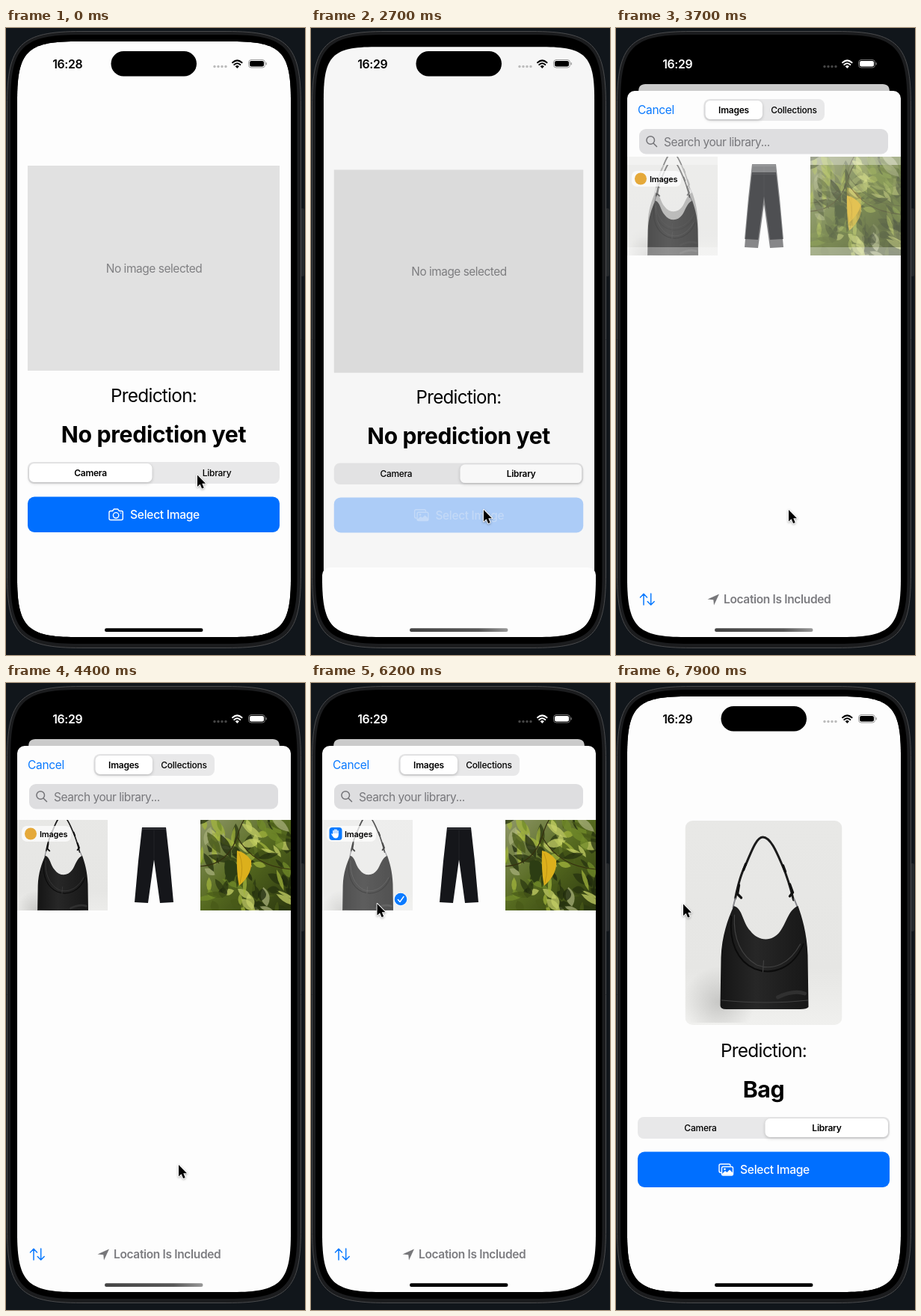
Write an HTML page with a canvas that moves like this. It is 400 px wide and 838 px high and loops after 8000 ms.

```html
<!DOCTYPE html>
<html lang="en">
<head>
<meta charset="utf-8">
<style>
  html, body { margin: 0; width: 400px; height: 838px; overflow: hidden; background: #11161b; }
  canvas { display: block; }
</style>
</head>
<body>
<canvas id="stage" width="400" height="838"></canvas>
<script>
const LOOP = 8000, BLUE = '#006fff';
const OPEN = 2657, CLOSE = 7420, SELECT = 5700;
const stage = document.getElementById('stage').getContext('2d');
let ctx = stage;

const lerp = (a, b, k) => a + (b - a) * k;
const ramp = (t, from, to) => Math.max(0, Math.min(1, (t - from) / (to - from)));
const ease = (t, from, to) => { const k = ramp(t, from, to); return k * k * (3 - 2 * k); };
const spring = (t, w) => t <= 0 ? 0 : Math.min(1, 1.002 * (1 - (1 + w * t) * Math.exp(-w * t)));

function group(draw, alpha = 1) {
  ctx.save();
  ctx.globalAlpha *= alpha;
  draw();
  ctx.restore();
}
function box(x, y, w, h, r, fill) {
  ctx.beginPath();
  ctx.roundRect(x, y, w, h, r);
  if (fill) { ctx.fillStyle = fill; ctx.fill(); }
}
// Rectangle with continuous-curvature corners
function smoothBox(x, y, w, h, r, fill) {
  const e = 1.53 * r, c = 0.268 * r, x2 = x + w, y2 = y + h;
  ctx.beginPath();
  ctx.moveTo(x, y + e);
  ctx.bezierCurveTo(x, y + c, x + c, y, x + e, y);
  ctx.lineTo(x2 - e, y);
  ctx.bezierCurveTo(x2 - c, y, x2, y + c, x2, y + e);
  ctx.lineTo(x2, y2 - e);
  ctx.bezierCurveTo(x2, y2 - c, x2 - c, y2, x2 - e, y2);
  ctx.lineTo(x + e, y2);
  ctx.bezierCurveTo(x + c, y2, x, y2 - c, x, y2 - e);
  ctx.closePath();
  if (fill) { ctx.fillStyle = fill; ctx.fill(); }
}
function disc(x, y, r, fill) {
  ctx.beginPath();
  ctx.arc(x, y, r, 0, 7);
  ctx.fillStyle = fill;
  ctx.fill();
}
function fillPath(d, color) {
  ctx.fillStyle = color;
  ctx.fill(new Path2D(d));
}
function line(d, color, width = 1.5) {
  ctx.strokeStyle = color;
  ctx.lineWidth = width;
  ctx.lineCap = ctx.lineJoin = 'round';
  ctx.stroke(new Path2D(d));
}
function text(str, x, y, size, weight = 400, color = '#000', align = 'center', track = -0.03) {
  ctx.font = `${weight} ${size}px Inter, sans-serif`;
  ctx.letterSpacing = `${size * track}px`;
  ctx.textAlign = align;
  ctx.fillStyle = color;
  ctx.fillText(str, x, y);
}
function segments(x, y, w, labels, centers, thumbX, thumbW, active) {
  box(x, y, w, 29, 8, '#e8e8e9');
  group(() => {
    ctx.shadowColor = 'rgba(0,0,0,.2)';
    ctx.shadowBlur = 4;
    ctx.shadowOffsetY = 1.5;
    box(thumbX, y + 2, thumbW, 25, 6.5, '#fff');
  });
  labels.forEach((label, i) =>
    text(label, centers[i], y + 18.7, 12, i === active ? 600 : 500, '#000', 'center', -0.02));
}

// Handbag photograph, 210 x 273
function bagPhoto() {
  const wall = ctx.createLinearGradient(0, 0, 0, 273);
  wall.addColorStop(0, '#e8e8e6');
  wall.addColorStop(0.72, '#e6e6e4');
  wall.addColorStop(1, '#f0f0ee');
  box(0, 0, 210, 273, 0, wall);
  const shade = ctx.createRadialGradient(45, 243, 2, 45, 243, 48);
  shade.addColorStop(0, 'rgba(120,120,118,.3)');
  shade.addColorStop(1, 'rgba(120,120,118,0)');
  box(0, 190, 100, 80, 0, shade);
  line('M67 104C71 84 75 70 81 59C88 43 95 22 104 22C115 22 124 46 131 62C137 76 141 90 145 106', '#1b1b1b', 3);
  line('M72 86L70 98L75 103M140 85L144 96L140 101M81 58L78 66M131 60L134 68', '#111', 3.4);
  line('M67 104L64 116M146 105L150 115', '#85858a', 2);
  const hide = ctx.createLinearGradient(48, 0, 165, 0);
  hide.addColorStop(0, '#151515');
  hide.addColorStop(0.4, '#272727');
  hide.addColorStop(1, '#171717');
  fillPath('M65 114C77 117 77 137 87 147C98 162 117 162 127 148C135 138 138 119 151 114C156 128 163 150 164 180L165 249Q163 252 154 252L55 252Q47 252 47 247L48 183C49 154 57 132 65 114Z', hide);
  line('M62 128C58 162 70 188 93 198C116 207 145 198 158 165', '#0b0b0b', 2);
  line('M66 126C64 158 75 181 96 193C118 201 140 191 154 165M105 187L104 202M49 240Q110 246 164 240', '#414141', 1.2);
  line('M124 236Q145 226 160 231', '#303030', 5);
}

// Foliage photograph, 121 x 121
function leafPhoto() {
  let seed = 11;
  const rnd = () => (seed = seed * 16807 % 2147483647) / 2147483647;
  const tones = ['#1f290d', '#2b3811', '#485a18', '#718b29', '#a1b43c', '#c4cf66', '#26320f', '#a6ad78'];
  const base = ctx.createLinearGradient(0, 0, 121, 121);
  base.addColorStop(0, '#8f9768');
  base.addColorStop(0.5, '#55691f');
  base.addColorStop(1, '#2c380f');
  box(0, 0, 121, 121, 0, base);
  for (let i = 0; i < 110; i++) group(() => {
    ctx.translate(rnd() * 121, rnd() * 121);
    ctx.rotate(rnd() * 2.2 - 0.3);
    const l = 6 + rnd() * 11, w = 2 + rnd() * 4;
    fillPath(`M${-l} 0Q0 ${-w * 2} ${l} 0Q0 ${w * 2} ${-l} 0Z`, tones[rnd() * 8 | 0]);
  }, 0.75);
  line('M0 62Q38 60 50 20T78 0M50 24Q72 62 121 66', '#35300f', 1.2);
  fillPath('M33 55Q48 50 50 64Q48 80 38 84Q30 72 33 55Z', '#2c3d13');
  fillPath('M49 41Q60 43 68 54Q70 72 52 88Q48 72 49 41Z', '#dcb01c');
  line('M52 45Q59 62 53 84', '#b88e13', 0.8);
}

function trousers() {
  fillPath('M45 10H77L82 55L87 110L69 111L61 53L53 111L35 110L40 55Z', '#15161a');
  line('M46 12H76', '#4a4a50', 1);
  line('M61 14V52', '#27282d', 0.8);
}

function makeRow() {
  const canvas = document.createElement('canvas');
  canvas.width = 366;
  canvas.height = 121;
  ctx = canvas.getContext('2d');
  const scale = 121 / 210;
  group(() => {
    box(0, 0, 121, 121, 0);
    ctx.clip();
    ctx.translate(0, -18);
    ctx.scale(scale, scale);
    bagPhoto();
  });
  group(() => { ctx.translate(122, 0); trousers(); });
  group(() => {
    ctx.translate(245, 0);
    box(0, 0, 121, 121, 0);
    ctx.clip();
    leafPhoto();
  });
  ctx = stage;
  return canvas;
}
const photoRow = makeRow();

function phone() {
  box(0, 0, 400, 838, 0, '#11161b');
  box(394, 241, 5, 91, 2, '#26292c');
  smoothBox(1.5, 4.5, 393, 824, 65, '#1b1c1e');
  ctx.strokeStyle = '#4a4b4d';
  ctx.lineWidth = 1;
  ctx.stroke();
  smoothBox(6, 9, 383.5, 814, 60, '#000');
}

function buttonIcon(camera) {
  if (camera) {
    line('M140 645.5H142.5L144.5 643H149.5L151.5 645.5H154.5Q156.3 645.5 156.3 647.3V655.5Q156.3 657.5 154.3 657.5H140Q138 657.5 138 655.5V647.5Q138 645.5 140 645.5Z', '#fff', 1.4);
    line('M150.8 651.3A3.7 3.7 0 1 1 143.4 651.3A3.7 3.7 0 1 1 150.8 651.3M153.6 648.2V648.3', '#fff', 1.4);
  } else {
    line('M140.5 654.5Q138 654.5 138 652V645Q138 643 140 643H151Q153 643 153 645', '#fff', 1.4);
    line('M143.5 646.5H154.5Q156.5 646.5 156.5 648.5V656Q156.5 658 154.5 658H143.5Q141.5 658 141.5 656V648.5Q141.5 646.5 143.5 646.5Z', '#fff', 1.4);
    fillPath('M142 656L146 652L148.5 654L152 650.5L156 654.5V657.5H142Z', '#fff');
    disc(145.5, 649.8, 1.3, '#fff');
  }
}

function mainView(t, p) {
  const scale = 1 - 0.082 * p, radius = lerp(51, 9, p);
  ctx.translate(198, 18 + 57 * p);
  ctx.scale(scale, scale);
  ctx.translate(-198, -18);
  smoothBox(15, 18, 366, 796, radius, '#fdfdfd');
  const done = t >= CLOSE, slide = ease(t, 90, 310);
  if (done) group(() => {
    box(92.5, 184, 210, 273, 10);
    ctx.clip();
    ctx.translate(92.5, 184);
    bagPhoto();
  });
  else {
    box(29, 184, 337, 274, 0, '#e1e1e1');
    text('No image selected', 198, 326.5, 15.5, 400, '#808083');
  }
  text('Prediction:', 197.5, 500, 24.4);
  text(done ? 'Bag' : 'No prediction yet', 197.5, 554, 30.3, 700, '#000', 'center', -0.012);
  segments(29, 580, 337, ['Camera', 'Library'], [113, 282], lerp(31, 199.5, slide), 164.5, t < 200 ? 0 : 1);
  const pressed = ease(t, 2450, 2600) - ease(t, 2750, 3000);
  group(() => {
    box(29, 626.5, 337, 47.5, 9, BLUE);
    buttonIcon(t < 100);
    text('Select Image', 212.5, 656, 15.6, 500, '#fff', 'center', -0.02);
  }, 1 - 0.7 * pressed);
  smoothBox(15, 18, 366, 796, radius, `rgba(0,0,0,${0.2 * p})`);
}

function badge(t) {
  const hand = ease(t, 4900, 5100);
  box(21, 191, 66, 21, 7, 'rgba(255,255,255,.72)');
  group(() => disc(33, 201.5, 8, '#e5a93a'), 1 - hand);
  group(() => {
    box(24.5, 193, 17, 17, 4, '#0a7aff');
    line('M30 202V197.5M32 201V196M34 201V196.2M36 202V197.8', '#fff', 1.5);
    fillPath('M29.2 201H36.8V203.5Q36.5 207.5 33 207.5Q30.5 207.5 29 205L27 201.7Q27.7 200.7 29.2 202.5Z', '#fff');
  }, hand);
  text('Images', 45, 205.6, 11, 600, '#000', 'left', -0.02);
}

function picker(t) {
  text('Cancel', 29, 115, 15.5, 400, '#0a7aff', 'left', -0.02);
  segments(117.5, 95, 161.5, ['Images', 'Collections'], [157.5, 238], 119.5, 76.5, 0);
  box(31, 135, 333, 33.5, 9, '#dedee0');
  line('M51.5 150A5.3 5.3 0 1 1 40.9 150A5.3 5.3 0 1 1 51.5 150M50 154L54.5 158.5', '#737377', 1.5);
  text('Search your library...', 64, 157.5, 15.5, 400, '#77777b', 'left');

  const settle = ramp(t, 3600, 3800);
  if (settle < 1) group(() => ctx.drawImage(photoRow, 15, 172), 1 - settle);
  if (settle > 0) group(() => ctx.drawImage(photoRow, 15, 183), settle);

  group(() => {
    box(15, 183, 121, 121, 0, 'rgba(255,255,255,.25)');
    disc(120, 289, 9, '#fff');
    disc(120, 289, 8.3, '#0a7aff');
    line('M116.3 289.5L119 292.5L124 285.5', '#fff', 1.4);
  }, ramp(t, SELECT, SELECT + 100));
  group(() => badge(t), 1 - ease(t, 6700, 7000));

  line('M37 771V756.5M32.5 761L37 756.3L41.5 761M46.7 756V770.8M42.2 766.5L46.7 771L51.2 766.5', '#0a7aff', 1.5);
  fillPath('M122.5 763.5L138 756.5L131 771.5L130.3 764.2Z', '#77777a');
  text('Location Is Included', 144, 769, 15.5, 600, '#7c7c80', 'left', -0.022);
}

function sheet(t, p) {
  ctx.translate(0, 730 * (1 - p));
  box(15, 84, 366, 760, [10, 10, 0, 0], '#fdfdfd');
  const loaded = ramp(t, 2950, 3100);
  if (loaded > 0) group(() => picker(t), loaded);
}

function statusBar(t, p) {
  const light = p > 0.35, ink = light ? '#fff' : '#000';
  text(t < 100 ? '16:28' : '16:29', 82.3, 53.7, 15.8, 600, ink, 'center', -0.02);
  box(140.5, 31, 114.5, 33.5, 17, '#000');
  for (let i = 0; i < 4; i++) disc(279 + i * 5, 51.5, 1.7, light ? '#444' : '#bcbcbc');
  line('M303 46.2Q309.3 40.5 315.6 46.2M305.3 49Q309.3 45.5 313.3 49', ink, 2);
  fillPath('M306.7 51.2Q309.3 48.8 311.9 51.2L309.3 54Z', ink);
  box(324.5, 42.5, 22, 10.5, 3.5);
  ctx.strokeStyle = light ? '#777' : '#999';
  ctx.lineWidth = 1;
  ctx.stroke();
  box(326, 44, 19, 7.5, 2.3, ink);
  box(347.7, 46, 1.3, 3.5, 0.7, light ? '#777' : '#999');
}

function homeBar(t) {
  let fill = '#000';
  if (t > 2600 && t < 5000) {
    fill = ctx.createLinearGradient(132, 0, 264, 0);
    fill.addColorStop(0, '#444');
    fill.addColorStop(0.7, '#585858');
    fill.addColorStop(1, '#999');
  }
  box(132, 802.3, 131.5, 4.8, 2.4, fill);
}

function cursor(t) {
  const a = ease(t, 700, 1500), b = ease(t, 4600, 5500), c = ease(t, 6400, 7000);
  const x = lerp(lerp(256, 231, a), 88.5, b) + 1.5 * c;
  const y = lerp(lerp(597.5, 644, a), 295, b) + 0.5 * c;
  const arrow = 'M0 0V15.5L3.6 12.2L6.1 18L8.7 16.9L6.3 11.2H11Z';
  ctx.translate(x, y);
  ctx.shadowColor = 'rgba(0,0,0,.35)';
  ctx.shadowBlur = 3;
  ctx.shadowOffsetY = 1;
  line(arrow, '#fff', 1.8);
  ctx.shadowColor = 'transparent';
  fillPath(arrow, '#000');
}

function render(now) {
  const t = now % LOOP;
  const p = spring(t - OPEN, 0.014) - spring(t - CLOSE, 0.018);
  phone();
  group(() => {
    smoothBox(15, 18, 366, 796, 51);
    ctx.clip();
    group(() => mainView(t, p));
    if (p > 0) group(() => sheet(t, p));
    statusBar(t, p);
    homeBar(t);
  });
  group(() => cursor(t));
}

const start = performance.now();
function tick() {
  render(performance.now() - start);
  requestAnimationFrame(tick);
}
tick();
</script>
</body>
</html>
```
